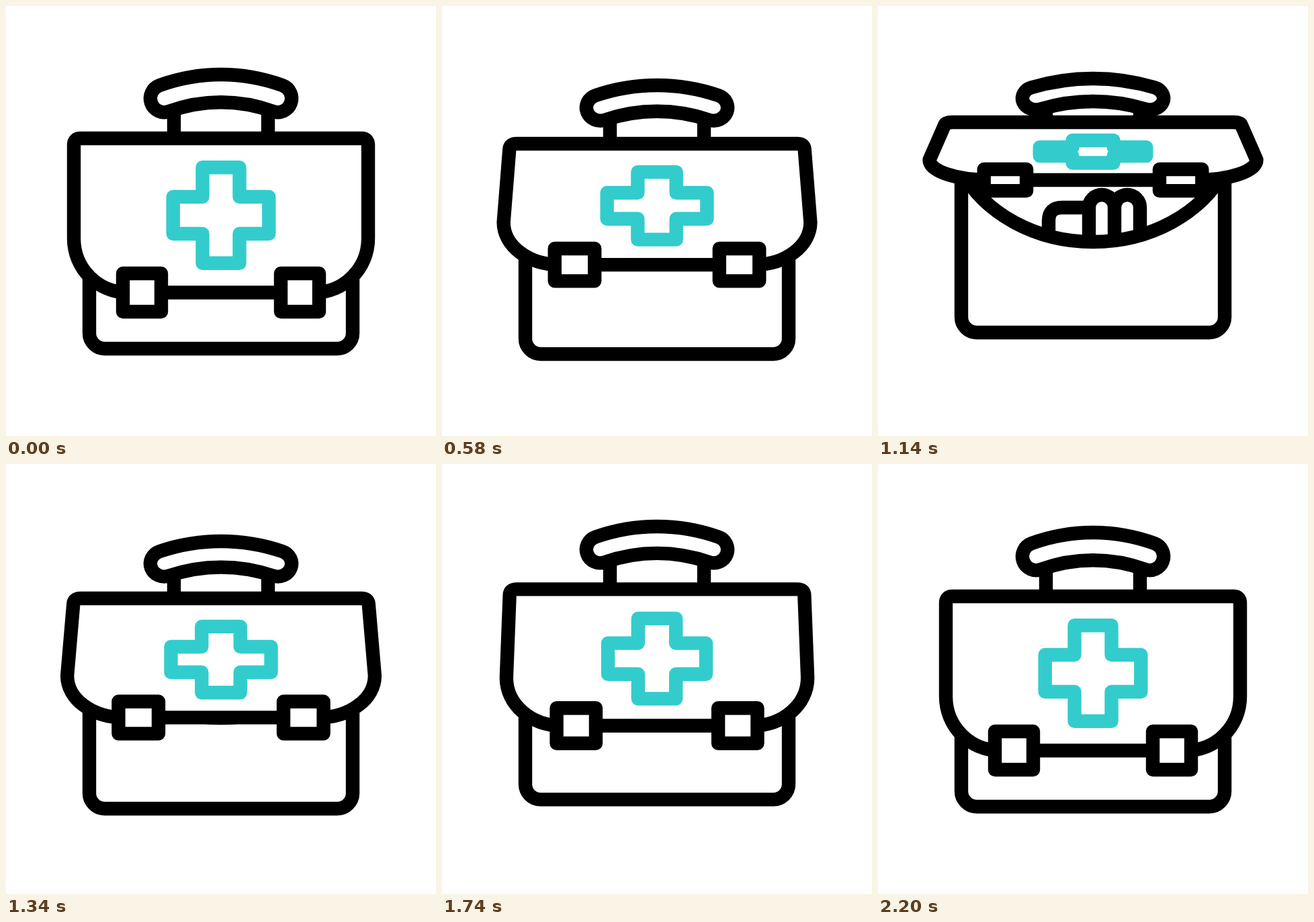
Recreate the animation shown at these times as an HTML page with a canvas. Size 640x640 px, loop 2.32 s.

```html
<!DOCTYPE html>
<html lang="en">
<head>
<meta charset="utf-8">
<title>First aid bag</title>
<style>
html, body { margin: 0; width: 100%; height: 100%; overflow: hidden; background: #fff; }
canvas { display: block; width: 640px; height: 640px; }
</style>
</head>
<body>
<canvas id="stage" width="640" height="640"></canvas>
<script>
const ctx = document.getElementById('stage').getContext('2d');
const LOOP = 2320, STEP = 20, TOP = 197, MID = 320;

// time, bag offset, handle offset, how far the flap is open
const KEYS = [
  [0, 0, 0, 0], [220, 0, 0, 0], [300, 10, 8, -.01], [412, 27, 24, -.03],
  [580, 8, 16, .215], [740, -13, 11, .485], [900, -20.6, 8.6, .595],
  [1010, -24, 6, .625], [1180, -24, 6, .625], [1280, -11, 9, .475],
  [1340, 3, 13, .227], [1465, 22, 19, -.02], [1690, -13, -12, .125],
  [1740, -10.6, -9, .115], [1820, -1, -1, .085], [1920, 8, 7, 0],
  [2180, 0, 0, 0], [LOOP, 0, 0, 0]
];

function rate(i, col) {
  return (KEYS[i + 1][col] - KEYS[i][col]) / (KEYS[i + 1][0] - KEYS[i][0]);
}

function slope(i, col) {
  if (i === 0 || i === KEYS.length - 1) return 0;
  const a = rate(i - 1, col), b = rate(i, col);
  return a * b > 0 ? 2 * a * b / (a + b) : 0;
}

// Smooth curve through the keys, without overshoot
function track(t, col) {
  let i = 0;
  while (t >= KEYS[i + 1][0]) i++;
  const d = KEYS[i + 1][0] - KEYS[i][0], u = (t - KEYS[i][0]) / d;
  const p = KEYS[i][col], q = KEYS[i + 1][col], v = 1 - u;
  return p * v * v * (1 + 2 * u) + q * u * u * (3 - 2 * u) +
    d * u * v * (slope(i, col) * v - slope(i + 1, col) * u);
}

function paint(path, color = '#000', fill) {
  if (fill) {
    ctx.fillStyle = fill;
    ctx.fill(path);
  }
  ctx.strokeStyle = color;
  ctx.stroke(path);
}

// Scales the path but not its line width
function placed(path, sx, sy, x, y) {
  const out = new Path2D();
  out.addPath(path, new DOMMatrix([sx, 0, 0, sy, x, y]));
  return out;
}

const body = new Path2D('M124 230V487a23 23 0 0 0 23 23H493a23 23 0 0 0 23 -23V230');
const front = new Path2D('M124 269A215 180 0 0 0 516 269V510H124Z');
const rim = new Path2D('M124 269A215 180 0 0 0 516 269');
const contents = new Path2D('M254 372V344q0 -20 20 -20H314' +
  'M314 380V324a19 19 0 0 1 38 0V380M352 324a19 19 0 0 1 38 0V380');
const handle = new Path2D('M-91.5 15.8A267 267 0 0 1 91.5 15.8' +
  'A20.6 20.6 0 0 1 77.5 54.6A226 226 0 0 0 -77.5 54.6A20.6 20.6 0 0 1 -91.5 15.8Z');
const buckle = new Path2D('M-28.5 -28.5H28.5V28.5H-28.5Z');
const cross = new Path2D('M-27.5 -71.3H27.5V-27.5H71.3V27.5H27.5V71.3' +
  'H-27.5V27.5H-71.3V-27.5H-27.5Z');

function flapPath(squash, widen) {
  const path = new Path2D();
  const add = (cmd, ...pts) => path[cmd](...pts.flatMap(([x, y]) => [
    MID + x * (1 + (widen - 1) * Math.min(1, y / 149)),
    TOP + y * squash
  ]));
  add('moveTo', [-209, 0]);
  add('lineTo', [209, 0]);
  add('quadraticCurveTo', [219, 0], [219, 10]);
  add('lineTo', [219, 149]);
  add('bezierCurveTo', [219, 193.5], [183.5, 229.5], [139, 229.5]);
  add('lineTo', [-139, 229.5]);
  add('bezierCurveTo', [-183.5, 229.5], [-219, 193.5], [-219, 149]);
  add('lineTo', [-219, 10]);
  add('quadraticCurveTo', [-219, 0], [-209, 0]);
  path.closePath();
  return path;
}

function draw(t) {
  const bagY = track(t, 1), handleY = 102.3 + track(t, 2), open = track(t, 3);
  const squash = 1 - open;
  const widen = 1 + .21 * open - .05 * open * open;

  ctx.setTransform(1, 0, 0, 1, 0, 0);
  ctx.fillStyle = '#fff';
  ctx.fillRect(0, 0, 640, 640);
  ctx.lineWidth = 20.4;
  ctx.lineJoin = 'round';

  const posts = new Path2D();
  for (const x of [250, 390]) {
    posts.moveTo(x, handleY + 46);
    posts.lineTo(x, TOP + bagY);
  }
  paint(posts);
  paint(placed(handle, 1, 1 - .28 * open, MID, handleY), '#000', '#fff');

  ctx.translate(0, bagY);
  paint(contents);
  ctx.fillStyle = '#fff';
  ctx.fill(front);
  paint(rim);
  paint(body);
  paint(flapPath(squash, widen), '#000', '#fff');

  const edge = TOP + 229.5 * squash;
  for (const side of [-1, 1]) {
    const x = MID + side * 117.5 * widen;
    paint(placed(buckle, widen, 1 - .7 * open, x, edge), '#000', '#fff');
  }
  const crossScale = 1 - 1.45 * open + .36 * open * open;
  const crossY = TOP + 114.5 * squash + 24 * open * squash ** 3;
  paint(placed(cross, widen, crossScale, MID, crossY), '#33cccc');
}

const start = performance.now();
function tick() {
  const t = (performance.now() - start) % LOOP;
  draw(t - t % STEP);
  requestAnimationFrame(tick);
}
tick();
</script>
</body>
</html>
```
